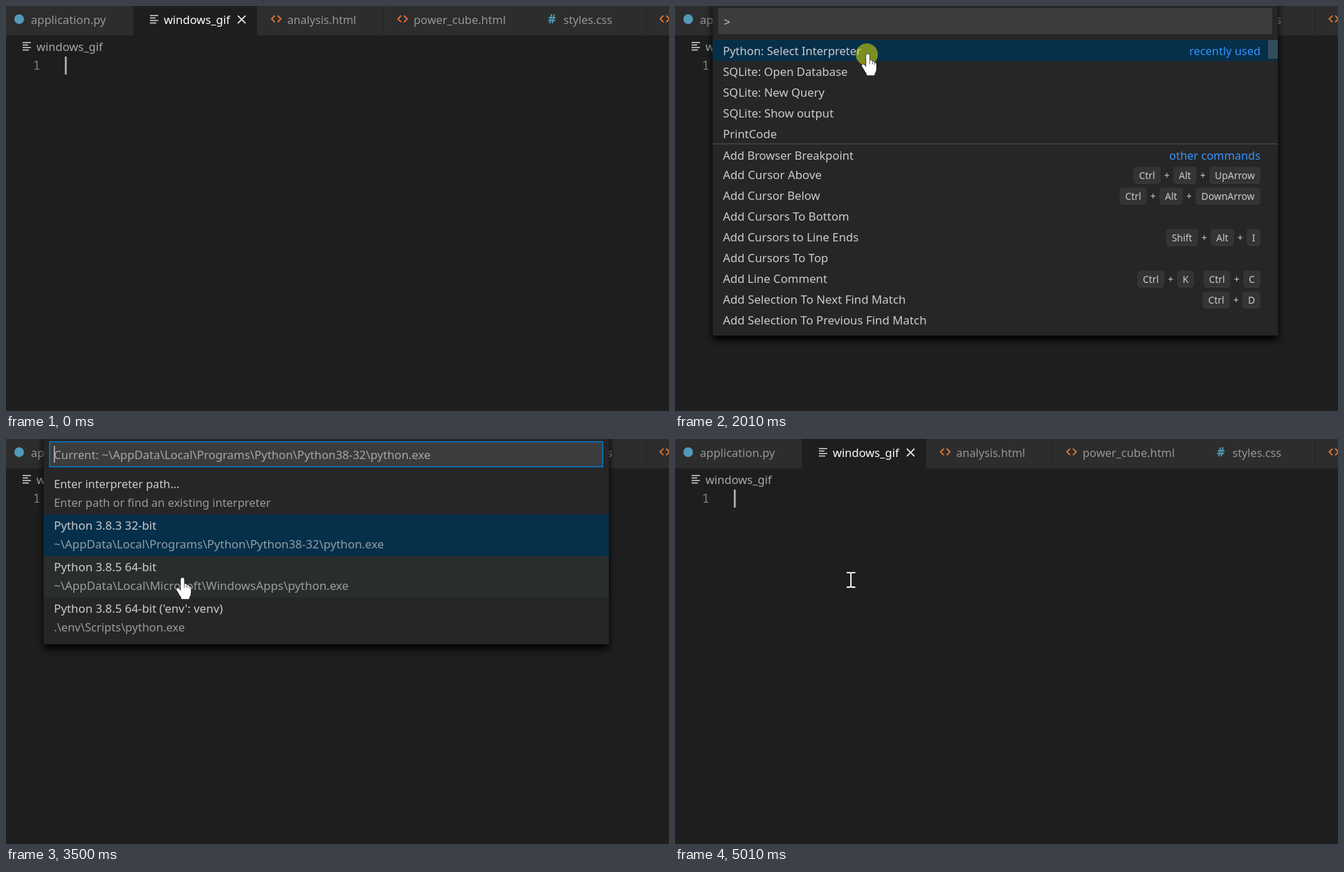
Animation of 958 by 585 pixels, one loop 5510 ms. Source, as an HTML page:

```html
<!DOCTYPE html>
<html lang="en">
<head>
<meta charset="utf-8">
<title>Selecting an interpreter</title>
<style>
  html, body { margin: 0; width: 100%; height: 100%; overflow: hidden; background: #1e1e1e; }
  svg { display: block; width: 958px; height: 585px; }
  text { font-family: "Noto Sans", "Open Sans", sans-serif; fill: #ccc; white-space: pre; }
  .mono { font-family: "Noto Sans Mono", "DejaVu Sans Mono", monospace; }
</style>
</head>
<body>
<svg id="stage" viewBox="0 0 958 585">
  <defs>
    <filter id="shadow" x="-10%" y="-10%" width="120%" height="125%">
      <feDropShadow dx="0" dy="6.8" stdDeviation="5.4" flood-color="#000" flood-opacity="1"/>
    </filter>
  </defs>
</svg>
<script>
const LOOP = 5510;
const stage = document.getElementById('stage');

function add(parent, tag, attrs = {}, content) {
  const node = document.createElementNS('http://www.w3.org/2000/svg', tag);
  for (const key in attrs) node.setAttribute(key, attrs[key]);
  if (content !== undefined) node.textContent = content;
  parent.appendChild(node);
  return node;
}
const group = (parent, attrs) => add(parent, 'g', attrs);
const rect = (parent, x, y, width, height, fill, more) =>
  add(parent, 'rect', { x, y, width, height, fill, ...more });
const line = (parent, d, stroke, width) =>
  add(parent, 'path', { d, stroke, 'stroke-width': width, fill: 'none' });
const label = (parent, x, y, content, { size = 16.75, ...more } = {}) =>
  add(parent, 'text', { x, y, style: `font-size:${size}px`, ...more }, content);
// Style rules outrank presentation attributes, so colours go inline.
const tint = (node, colour) => { node.style.fill = colour; return node; };
const show = (node, on) => node.setAttribute('visibility', on ? 'visible' : 'hidden');

// Editor

function linesIcon(x, y) {
  [12, 8, 12, 9].forEach((w, i) => rect(stage, x, y + i * 3.6, w, 1.5, '#d0d3d2'));
}
function anglesIcon(x) {
  line(stage, `M${x - 2} 13.8l-4.7 4.8 4.7 4.8M${x + 2} 13.8l4.7 4.8 -4.7 4.8`, '#e37933', 1.8);
}
function tab(x, width, textX, name, size, active) {
  rect(stage, x, 0, width, 42.5, active ? '#1e1e1e' : '#2d2d2d');
  tint(label(stage, textX, 26, name, { size }), active ? '#fff' : '#969696');
}

function buildEditor() {
  rect(stage, 0, 0, 958, 585, '#1e1e1e');
  rect(stage, 0, 0, 958, 42.5, '#252526');
  tab(0, 183, 36, 'application.py', 16.55);
  tab(184, 178.5, 228, 'windows_gif', 16.55, true);
  tab(363, 181, 406.5, 'analysis.html', 16.15);
  tab(545, 216, 589, 'power_cube.html', 16.4);
  tab(762, 162, 805.5, 'styles.css', 16.2);
  tab(925, 33, 968, '');
  add(stage, 'circle', { cx: 19, cy: 19, r: 7, fill: '#519aba' });
  linesIcon(208, 13);
  line(stage, 'M335 14l11 11m0-11l-11 11', '#fff', 1.7);
  [390.5, 573, 952].forEach(anglesIcon);
  tint(label(stage, 783, 25.2, '#', { size: 18, 'font-weight': 700 }), '#519aba');
  linesIcon(24, 52);
  tint(label(stage, 44, 64.6, 'windows_gif', { size: 16.55 }), '#a9a9a9');
  tint(label(stage, 39, 92.3, '1', { size: 17.5, class: 'mono' }), '#858585');
  rect(stage, 85, 73, 2.7, 26, '#aeafad');
}

// Quick pick panels

const LEFT = 54.5, WIDTH = 816.5, RIGHT = 846, TEXT_X = 69.2;

function panel(bottom) {
  const root = group(stage);
  rect(root, LEFT, -20, WIDTH, bottom + 20, '#252526', { filter: 'url(#shadow)' });
  rect(root, 62.5, 3.2, 800.5, 37.6, '#3c3c3c');
  const focus = rect(root, 63.2, 4, 799, 36.2, 'none', { stroke: '#0079cb', 'stroke-width': 1.5 });
  return { root, focus };
}

const KEY_WIDTH = { Ctrl: 39, Alt: 33.5, Shift: 46, UpArrow: 74, DownArrow: 94, I: 20, K: 24.5, C: 25, D: 26 };

// Lays key caps out from the right; a space separates two chords.
function shortcut(parent, y, chords) {
  const middle = { size: 13.9, 'text-anchor': 'middle' };
  let right = RIGHT;
  for (const chord of chords.split(' ').reverse()) {
    chord.split('+').reverse().forEach((key, i) => {
      if (i) {
        label(parent, right - 9.2, y + 5.4, '+', middle);
        right -= 18.5;
      }
      const w = KEY_WIDTH[key];
      rect(parent, right - w, y - 12.2, w, 24, '#343435', { rx: 4 });
      rect(parent, right - w + 3, y + 11, w - 6, 1, '#3f3f40');
      label(parent, right - w / 2, y + 5.2, key, middle);
      right -= w;
    });
    right -= 13.5;
  }
}

function buildCommands() {
  const view = panel(476);
  const { root } = view;
  const rows = [
    ['Python: Select Interpreter', 16.55],
    ['SQLite: Open Database', 16.65],
    ['SQLite: New Query', 16.7],
    ['SQLite: Show output', 16.8],
    ['PrintCode', 16.7],
    ['Add Browser Breakpoint', 16.55],
    ['Add Cursor Above', 16.9, 'Ctrl+Alt+UpArrow'],
    ['Add Cursor Below', 16.75, 'Ctrl+Alt+DownArrow'],
    ['Add Cursors To Bottom', 16.75],
    ['Add Cursors to Line Ends', 16.7, 'Shift+Alt+I'],
    ['Add Cursors To Top', 16.75],
    ['Add Line Comment', 16.75, 'Ctrl+K Ctrl+C'],
    ['Add Selection To Next Find Match', 16.9, 'Ctrl+D'],
    ['Add Selection To Previous Find Match', 16.87],
  ];
  label(root, 70.5, 29, '>');
  rect(root, LEFT, 49, WIDTH, 30.5, '#062f4a');
  rect(root, LEFT, 198.5, WIDTH, 1.3, '#4a4a4c');
  rows.forEach(([name, size, keys], i) => {
    const y = i < 5 ? 65 + 30 * i : i === 5 ? 216 : 64.4 + 30 * i;
    label(root, TEXT_X, y + 6, name, { size });
    if (keys) shortcut(root, y, keys);
  });
  const hint = { size: 16.4, 'text-anchor': 'end' };
  tint(label(root, RIGHT, 71, 'recently used', hint), '#3794ff');
  tint(label(root, RIGHT, 222, 'other commands', hint), '#3794ff');
  view.scrollbar = rect(root, 857, 49, 14, 27, '#344d5d');
  view.caret = rect(root, 81, 10, 1.4, 24, '#ccc');
  return view;
}

function buildInterpreters() {
  const view = panel(296.5);
  const { root } = view;
  const local = '~\\AppData\\Local\\';
  const main = local + 'Programs\\Python\\Python38-32\\python.exe';
  const rows = [
    ['Enter interpreter path...', 16.32, 'Enter path or find an existing interpreter', 16.47],
    ['Python 3.8.3 32-bit', 16.85, main, 16.84],
    ['Python 3.8.5 64-bit', 16.85, local + 'Microsoft\\WindowsApps\\python.exe', 16.92],
    ["Python 3.8.5 64-bit ('env': venv)", 16.85, '.\\env\\Scripts\\python.exe', 16.57],
  ];
  tint(label(root, TEXT_X, 29, 'Current: ' + main, { size: 16.77 }), '#a6a6a6');
  view.hover = rect(root, LEFT, 49, WIDTH, 60, '#2a2d2e');
  rect(root, LEFT, 109, WIDTH, 60, '#062f4a');
  rows.forEach(([name, size, detail, detailSize], i) => {
    label(root, TEXT_X, 71 + 60 * i, name, { size });
    label(root, TEXT_X, 98 + 60 * i, detail, { size: detailSize, opacity: 0.7 });
  });
  view.caret = rect(root, 69.2, 10, 1.4, 24, '#ccc');
  return view;
}

// Pointers

function buildHand() {
  const hand = group(stage);
  add(hand, 'path', {
    d: 'M-2.5 2.5Q-2.5 0 0 0T2.5 2.5V9.6Q3 8.8 4.6 9Q6.4 9.2 6.7 10.8Q8.8 10.2 9.8 12.2' +
       'Q12 12 12.2 14.8V22Q12 26 10 28.3L9.6 31H-1.7L-2 28.3Q-4 26 -5.6 22.5L-8.5 18' +
       'Q-9.6 14.8 -6.6 15Q-4.5 15.5 -2.5 19Z',
    fill: '#fff', stroke: '#111', 'stroke-width': 1.2, 'paint-order': 'stroke',
  });
  line(hand, 'M2.6 9.6v5M6.6 10.8v4M9.8 12.2v3.4', '#333', 0.8);
  return hand;
}

buildEditor();
const commands = buildCommands();
const interpreters = buildInterpreters();
const click = add(stage, 'circle', { r: 16, fill: '#e6e600', 'fill-opacity': 0.52 });
const hand = buildHand();
const beam = group(stage);
line(beam, 'M248 193h4.5l1.7 1 1.7-1h4.6M248 214h4.5l1.7-1 1.7 1h4.6M254.2 193.5v20', '#fff', 1.9);

// Each step holds until the next: start, open view, caret, pointer tip, click centre.
const steps = [
  { at: 0 },
  { at: 520, view: commands, caret: true, focus: true },
  { at: 1010, view: commands, focus: true },
  { at: 1510, view: commands, caret: true, focus: true, tip: [318.5, 67] },
  { at: 2010, view: commands, tip: [278.7, 69.3], click: [277.2, 70] },
  { at: 2510, view: interpreters, caret: true, focus: true, tip: [278.7, 69.3], hover: 0 },
  { at: 2990, view: interpreters, focus: true, tip: [278.3, 71.3], hover: 0 },
  { at: 3500, view: interpreters, caret: true, focus: true, tip: [255, 200.3], hover: 2 },
  { at: 4000, view: interpreters, focus: true, tip: [252.7, 202.3], hover: 2 },
  { at: 4500, view: interpreters, tip: [252.7, 202.3], click: [251.7, 202.5], hover: 2 },
  { at: 5010, beam: true },
];

function render(time) {
  const step = steps.filter(s => s.at <= time).pop();
  for (const view of [commands, interpreters]) {
    const open = step.view === view;
    view.root.setAttribute('display', open ? 'inline' : 'none');
    show(view.caret, open && step.caret);
    show(view.focus, open && step.focus);
  }
  commands.scrollbar.setAttribute('fill', step.at < 1010 ? '#2a4659' : '#344d5d');
  interpreters.hover.setAttribute('y', 49 + 60 * (step.hover || 0));
  show(hand, step.tip);
  if (step.tip) hand.setAttribute('transform', `translate(${step.tip})`);
  show(click, step.click);
  if (step.click) click.setAttribute('transform', `translate(${step.click})`);
  show(beam, step.beam);
}

const start = performance.now();
function tick() {
  render((performance.now() - start) % LOOP);
  requestAnimationFrame(tick);
}
tick();
</script>
</body>
</html>
```
